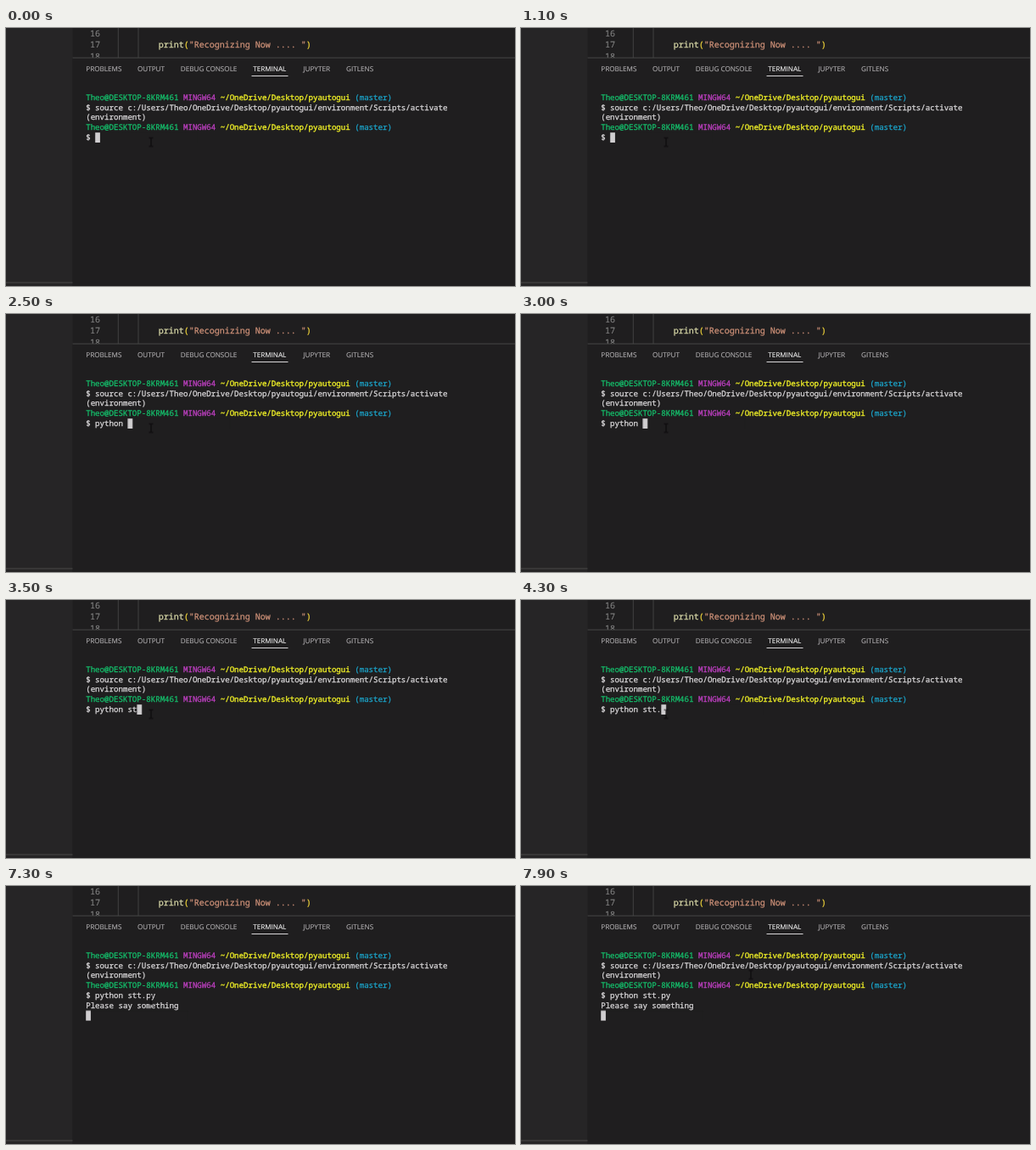
An HTML page that plays this animation: 600 by 304 pixels, repeating every 8000 ms.

```html
<!DOCTYPE html>
<html lang="en">
<head>
<meta charset="utf-8">
<title>Terminal</title>
<style>
  html, body { margin: 0; width: 100%; height: 100%; overflow: hidden; background: #1f1e1f; }
  svg { display: block; width: 600px; height: 304px; --w: 5.475px; --h: 11.8px; }
  text { white-space: pre; text-rendering: geometricPrecision; }
  text, tspan { fill: currentColor; stroke: currentColor; }

  .code { font: 10px "Noto Sans Mono", monospace; color: #dcdcaa; stroke-width: .25px; }
  .number { color: #858585; stroke-width: .1px; }
  .paren { color: #f0d43a; }
  .string { color: #ce9178; }

  .tabs { font: 8.15px "Open Sans", sans-serif; color: #b0aeb0; stroke-width: .12px; }
  .tabs .active { color: #f2f2f2; }

  .shell { font: 9.125px "Noto Sans Mono", monospace; color: #d8d6d8; stroke-width: .3px; }
  .user { color: #14bd6a; }
  .system { color: #bd3fc0; }
  .path { color: #e9e926; stroke-width: .4px; }
  .branch { color: #1ba5cb; }

  .cursor, .output, .pointer { animation: 8s -20ms infinite; }
  .cursor { animation-name: type; animation-timing-function: step-end; }
  .output { animation-name: reveal; animation-timing-function: step-end; }
  .pointer { animation-name: move; fill: none; stroke: #080608; }

  /* The cursor carries a cover that hides the text not typed yet. */
  @keyframes type {
    0%     { transform: translate(calc(2 * var(--w)), 0); }
    18.75% { transform: translate(calc(3 * var(--w)), 0); }
    22.5%  { transform: translate(calc(4 * var(--w)), 0); }
    23.75% { transform: translate(calc(5 * var(--w)), 0); }
    25%    { transform: translate(calc(6 * var(--w)), 0); }
    27.5%  { transform: translate(calc(7 * var(--w)), 0); }
    28.75% { transform: translate(calc(8 * var(--w)), 0); }
    31.25% { transform: translate(calc(9 * var(--w)), 0); }
    40%    { transform: translate(calc(10 * var(--w)), 0); }
    42.5%  { transform: translate(calc(11 * var(--w)), 0); }
    46.25% { transform: translate(calc(12 * var(--w)), 0); }
    51.25% { transform: translate(calc(13 * var(--w)), 0); }
    56.25% { transform: translate(calc(14 * var(--w)), 0); }
    58.75% { transform: translate(calc(15 * var(--w)), 0); }
    71.25% { transform: translate(0, var(--h)); }
    91.25%, 100% { transform: translate(0, calc(2 * var(--h))); }
  }
  @keyframes reveal {
    0% { visibility: hidden; }
    91.25%, 100% { visibility: visible; }
  }
  @keyframes move {
    0%, 92.5% { transform: translate(171px, 134.5px); animation-timing-function: ease-in-out; }
    97.5%, 100% { transform: translate(271px, 104.5px); }
  }
</style>
</head>
<body>
<svg viewBox="0 0 600 304">
  <rect width="600" height="304" fill="#1f1e1f"/>
  <rect width="78.5" height="304" fill="#262526"/>

  <path d="M132.3 0V35M156 0V35" stroke="#414041"/>
  <g class="code">
    <g class="number">
      <text x="99" y="10">16</text>
      <text x="99" y="23.3">17</text>
      <text x="99" y="36.7">18</text>
    </g>
    <text x="179.7" y="23.3">print<tspan class="paren">(</tspan><tspan class="string">"Recognizing Now .... "</tspan><tspan class="paren">)</tspan></text>
  </g>

  <rect x="78.5" y="35" width="522" height="269" fill="#1f1e1f"/>
  <rect x="78.5" y="34.6" width="522" height="1" fill="#474647"/>
  <g class="tabs">
    <text x="94.3" y="50.9">PROBLEMS</text>
    <text x="154.9" y="50.9">OUTPUT</text>
    <text x="205.8" y="50.9">DEBUG CONSOLE</text>
    <text class="active" x="291.2" y="50.9">TERMINAL</text>
    <text x="350.4" y="50.9">JUPYTER</text>
    <text x="401.1" y="50.9">GITLENS</text>
  </g>
  <rect x="289.5" y="56" width="43" height="1" fill="#d8d6d8"/>

  <g class="shell">
    <text id="prompt" x="94.2" y="84.7"><tspan class="user">Theo@DESKTOP-8KRM461</tspan> <tspan class="system">MINGW64</tspan> <tspan class="path">~/OneDrive/Desktop/pyautogui</tspan> <tspan class="branch">(master)</tspan></text>
    <text x="94.2" y="96.5">$ source c:/Users/Theo/OneDrive/Desktop/pyautogui/environment/Scripts/activate</text>
    <text x="94.2" y="108.3">(environment)</text>
    <use href="#prompt" y="35.4"/>
    <text x="94.2" y="132">$ python stt.py</text>
    <text class="output" x="94.2" y="143.8">Please say something</text>
  </g>

  <g class="cursor">
    <rect x="94.2" y="123.2" width="120" height="11.8" fill="#1f1e1f"/>
    <rect x="94.2" y="123.2" width="5.7" height="11.8" fill="#d0ced0"/>
  </g>

  <path class="pointer" d="M-2.5 -5H-.7L0 -4.4L.7 -5H2.5M0 -4.4V4.4M-2.5 5H-.7L0 4.4L.7 5H2.5"/>

  <rect y="299.5" width="78.5" height="1" fill="#4a4b49"/>
</svg>
</body>
</html>
```
